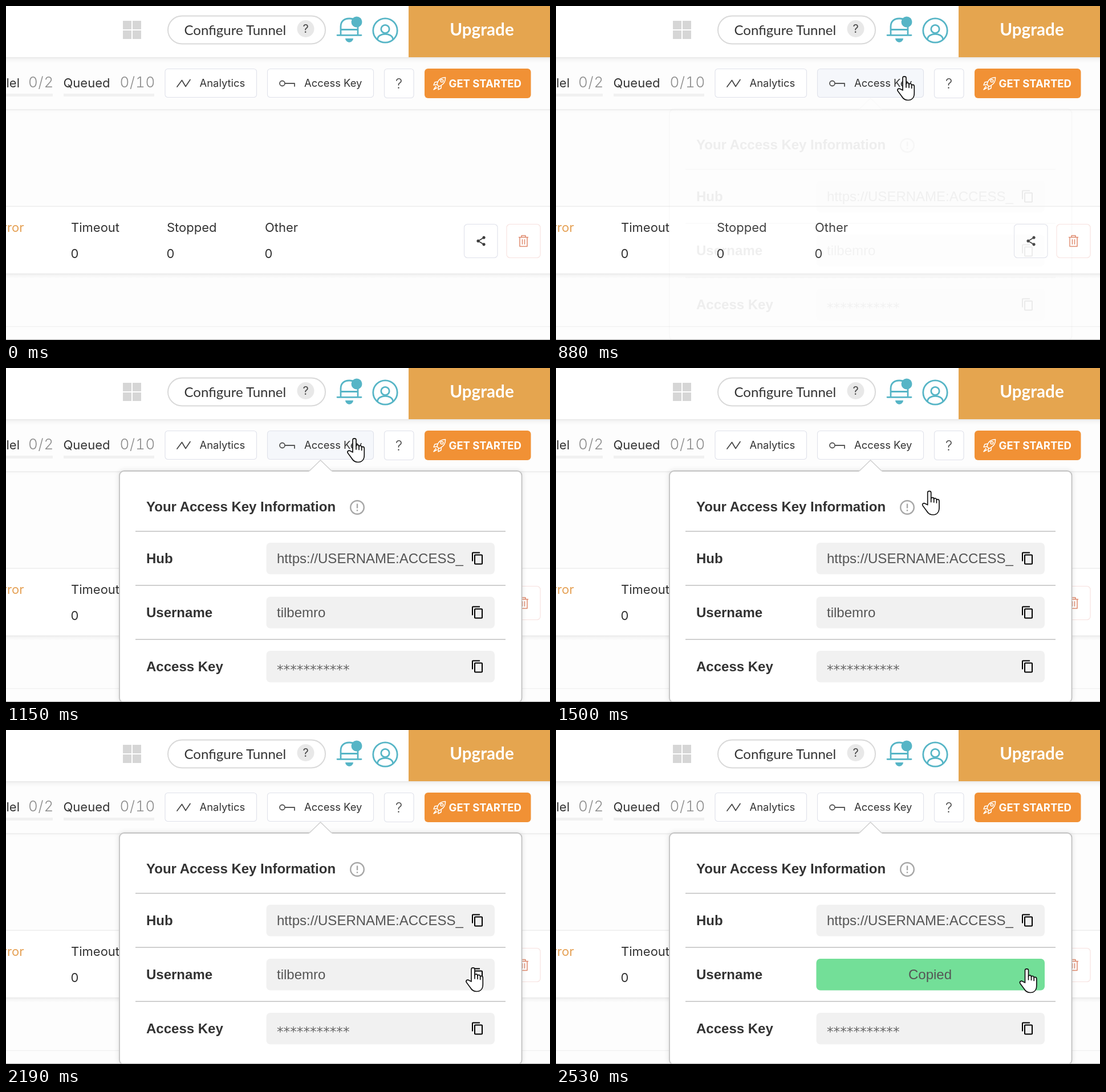
Write an HTML page that moves like this. It is 954 by 587 pixels and loops after 3460 ms.

```html
<!DOCTYPE html>
<html lang="en">
<head>
<meta charset="utf-8">
<title>Access key panel</title>
<style>
  html, body { margin: 0; width: 100%; height: 100%; overflow: hidden; background: #fdfdfd; }
  svg { display: block; width: 100vw; height: 100vh; }
  text { fill: #333; }
  .ui { font-family: Inter, sans-serif; font-size: 22px; }
  .small { font-size: 18.4px; }
  .count { font-size: 26px; font-weight: 300; fill: #8e8e8e; letter-spacing: .8px; font-feature-settings: "tnum"; }
  .lato { font-family: Lato, sans-serif; font-size: 24px; }
  .arial { font-family: "Liberation Sans", Arial, sans-serif; font-size: 24px; fill: #555; }
  .bold { font-weight: 700; fill: #333; }
  .mid { text-anchor: middle; }
  .end { text-anchor: end; }
  .btn { fill: #fff; stroke: #dfe1ea; stroke-width: 1.1; }
  .line { fill: none; stroke-linecap: round; stroke-linejoin: round; }
</style>
</head>
<body>
<svg viewBox="0 0 954 587" preserveAspectRatio="none">
  <defs>
    <linearGradient id="shade" x2="0" y2="1">
      <stop offset="0" stop-color="#000" stop-opacity=".09"/>
      <stop offset=".3" stop-color="#000" stop-opacity=".035"/>
      <stop offset="1" stop-color="#000" stop-opacity="0"/>
    </linearGradient>
    <path id="copy" d="M16 1H4c-1.1 0-2 .9-2 2v14h2V3h12V1zm3 4H8c-1.1 0-2 .9-2 2v14c0 1.1.9 2 2 2h11c1.1 0 2-.9 2-2V7c0-1.1-.9-2-2-2zm0 16H8V7h11v14z"/>
  </defs>
  <rect width="954" height="587" fill="#fdfdfd"/>

  <!-- top bar -->
  <rect width="954" height="90" fill="#fff"/>
  <path d="M205 26h15v15h-15zM222 26h15v15h-15zM205 43h15v15h-15zM222 43h15v15h-15z" fill="#d6d6d6"/>
  <rect x="284" y="17.5" width="276" height="49" rx="24.5" fill="#fff" stroke="#d9d9d9" stroke-width="2"/>
  <text class="lato" x="312.5" y="51">Configure Tunnel</text>
  <circle cx="525.5" cy="40" r="15" fill="#e8e8e8"/>
  <text class="ui mid" x="525.5" y="47" style="font-size:20px;fill:#444">?</text>
  <g class="line" stroke="#56b5c6" stroke-width="2.8">
    <path d="M587 50V36C587 27 593 22 602 22S617 27 617 36V50M587 41.5H617M581 51.3H623"/>
    <circle cx="665" cy="43" r="21.2"/>
    <circle cx="665" cy="40.5" r="7.2"/>
    <path d="M651.5 58C653 46.500 677 46.500 678.500 58"/>
  </g>
  <path d="M595 57H609C608 66 596 66 595 57Z" fill="#56b5c6"/>
  <circle cx="615" cy="28" r="9.5" fill="#56b5c6"/>
  <rect y="90" width="954" height="10" fill="url(#shade)"/>
  <rect x="706" width="248" height="90" fill="#e5a54f"/>
  <text class="lato mid" x="834.5" y="52" style="font-size:29.6px;font-weight:700;fill:#fff">Upgrade</text>

  <!-- toolbar -->
  <rect y="154" width="82" height="5" fill="#f1f1f1"/>
  <rect x="101" y="154" width="159" height="5" fill="#f1f1f1"/>
  <text class="ui end" x="24" y="143">lel</text>
  <text class="ui count" x="39" y="143">0/2</text>
  <text class="ui" x="100.500" y="143">Queued</text>
  <text class="ui count" x="199.500" y="143">0/10</text>
  <rect class="btn" x="279" y="110.500" width="160.500" height="50" rx="5"/>
  <path class="line" d="M300 142L308.500 130.500L315 141.500L323 129.500" stroke="#444" stroke-width="1.7"/>
  <text class="ui small" x="339.500" y="142">Analytics</text>
  <rect id="keyBtn" class="btn" x="458.500" y="110.500" width="186" height="50" rx="5"/>
  <g class="line" stroke="#555" stroke-width="1.8">
    <circle cx="484.500" cy="136" r="4.500"/>
    <path d="M489.500 136H506V141"/>
  </g>
  <text class="ui small" x="523" y="142">Access Key</text>
  <rect class="btn" x="663.500" y="110.500" width="51.500" height="51" rx="5"/>
  <text class="ui mid" x="689" y="145" style="font-size:24px;font-weight:300;fill:#444">?</text>
  <rect x="734" y="110" width="186.500" height="52" rx="6" fill="#f19135"/>
  <g class="line" stroke="#fff" stroke-width="1.5">
    <path d="M756 138C757 131 762 126 770.500 125.500C771 134 766 139 759 141.500ZM757.500 133L752 134L750 139L755.500 138M763.500 139L763 144.500L758 147L758.500 141.500M754 141L750 147L756 143.500"/>
    <circle cx="764.500" cy="131.500" r="2.300"/>
  </g>
  <text class="ui" x="776.500" y="143" style="font-size:18.500px;font-weight:700;fill:#fff">GET STARTED</text>
  <rect y="181.500" width="954" height="1.500" fill="#ebebeb"/>
  <rect y="183" width="954" height="6" fill="url(#shade)" opacity=".25"/>

  <!-- result row -->
  <rect y="352" width="954" height="119" fill="#fff"/>
  <rect y="351.500" width="954" height="1.300" fill="#ececec"/>
  <rect y="470" width="954" height="9" fill="url(#shade)"/>
  <text class="ui end" x="31.500" y="397" style="fill:#e5a155">Error</text>
  <g id="stats"></g>
  <rect class="btn" x="803.500" y="383.500" width="58.500" height="59" rx="6"/>
  <g fill="#3a3a3a" stroke="#3a3a3a">
    <path d="M838 407L828 413L838 419" fill="none" stroke-width="1.700"/>
    <circle cx="838" cy="407" r="2.200"/>
    <circle cx="828" cy="413" r="2.200"/>
    <circle cx="838" cy="419" r="2.200"/>
  </g>
  <rect class="btn" x="878" y="383.500" width="59" height="59" rx="6" style="stroke:#f7e1de"/>
  <path class="line" d="M899.500 406.500H915.500M901 406.500V422.500H914V406.500M904 406V403.500H911V406M905.500 410.500V418.500M909.500 410.500V418.500" stroke="#e08a6e" stroke-width="1.500"/>
  <rect y="562.700" width="954" height="1.300" fill="#f0f0f0"/>

  <!-- popup -->
  <g id="popup">
    <rect x="199" y="181" width="705.500" height="407" rx="8" fill="#fff" stroke="#c2c2c2" stroke-width="1.800" style="filter:drop-shadow(0 0 4px rgba(0,0,0,.12))"/>
    <path d="M530 183L551.500 162L573 183Z" fill="#fff"/>
    <path d="M532 181L551.500 162L571 181" fill="none" stroke="#cfcfcf" stroke-width="1.300"/>
    <text class="arial bold" x="246" y="252">Your Access Key Information</text>
    <circle cx="616" cy="245" r="11.800" fill="none" stroke="#a8a8a8" stroke-width="2.400"/>
    <path d="M614.800 238.500h2.400v8h-2.400zM614.800 249h2.400v2.500h-2.400z" fill="#a8a8a8"/>
    <g id="rows"></g>
    <g id="copied">
      <rect x="456.500" y="402" width="400.500" height="55.500" rx="7" fill="#73df98"/>
      <text class="arial mid" x="656" y="438">Copied</text>
    </g>
  </g>
  <rect y="585.800" width="954" height="1.200" fill="#b9b9b9"/>

  <g id="hand" class="line" stroke="#111" stroke-width="1.700">
    <path fill="#fff" d="M10 25V3.500C10 0 16 0 16 3.500V14C16.500 11.300 21 11.500 21 15C21.500 12.600 25.700 13 25.700 16.500C26.300 14.500 30.300 15 30.300 18.500V30C30.300 38 26 42.500 19.500 42.500C13 42.500 10.500 39.500 8.500 36L1.500 26.500C-.3 23.300 3 20.800 6 23Z"/>
    <path d="M16 14V20M21 15V20.500M25.700 17V21.500"/>
  </g>
</svg>
<script>
const LOOP = 3460;
const $ = id => document.getElementById(id);

$("stats").innerHTML = [["Timeout", 114], ["Stopped", 282], ["Other", 454]].map(([name, x]) =>
  `<text class="ui" x="${x}" y="397">${name}</text><text class="ui" x="${x - .5}" y="443">0</text>`).join("");

const masked = `<text x="475" y="538" style="font:23.2px 'DejaVu Sans',sans-serif;fill:#666">${"*".repeat(11)}</text>`;
const plain = (s, y) => `<text class="arial" x="475" y="${y}">${s}</text>`;
$("rows").innerHTML = [
  ["Hub", plain("https://USERNAME:ACCESS_", 343)],
  ["Username", plain("tilbemro", 438)],
  ["Access Key", masked]
].map(([label, value], i) => {
  const y = 287 + 95 * i;
  return `<rect x="227" y="${y - .8}" width="649" height="1.6" fill="#c4c4c4"/>
    <text class="arial bold" x="246" y="${y + 56}">${label}</text>
    <rect x="456.5" y="${y + 20}" width="400.5" height="55.5" rx="7" fill="#f1f1f1"/>
    ${value}<use href="#copy" x="815" y="${y + 35.5}"/>`;
}).join("");

const linear = p => p;
const smooth = p => p * p * (3 - 2 * p);
const out = n => p => 1 - (1 - p) ** n;

// Pointer legs in ticks: start, length, from, to, easing for x and y
const moves = [
  { at: 190, tick: 70, legs: [
    [0, 5, [815, 560], [607, 127], out(2), out(2.5)],
    [5, 2, [607, 127], [598, 123], linear, linear]] },
  { at: 1350, tick: 68, legs: [
    [-1, 7, [598, 123], [700, 358], linear, smooth],
    [6, 1, [700, 358], [716, 366], linear, linear]] },
  { at: 1900, tick: 70, legs: [
    [-1, 5, [716, 366], [806, 417], out(2), out(2)],
    [4, 3, [806, 417], [812.5, 419], linear, linear]] }
];

function pointer(t) {
  const move = moves.filter(m => t >= m.at).pop();
  if (!move) return null;
  const k = Math.min(7, Math.floor((t - move.at) / move.tick));
  const [start, length, a, b, ex, ey] = move.legs.filter(l => k >= l[0]).pop();
  const p = Math.min(1, (k - start) / length);
  return [a[0] + (b[0] - a[0]) * ex(p), a[1] + (b[1] - a[1]) * ey(p)];
}

function popupAlpha(t) {
  return t < 880 ? 0 : t < 1010 ? .07 : t < 1080 ? .3 : t < 1150 ? .66 : 1;
}

function draw(t) {
  const pos = pointer(t);
  let over = false;
  $("hand").style.display = pos ? "" : "none";
  if (pos) {
    const [x, y] = pos, tip = x + 13;
    $("hand").setAttribute("transform", `translate(${x.toFixed(1)} ${y.toFixed(1)})`);
    over = tip > 458 && tip < 645 && y > 110 && y < 161;
  }
  $("keyBtn").style.fill = over ? "#f5f7fb" : "#fff";
  $("popup").setAttribute("opacity", popupAlpha(t));
  $("copied").style.display = t >= 2530 ? "" : "none";
}

const began = performance.now();
function tick() {
  draw((performance.now() - began) % LOOP);
  requestAnimationFrame(tick);
}
tick();
</script>
</body>
</html>
```
